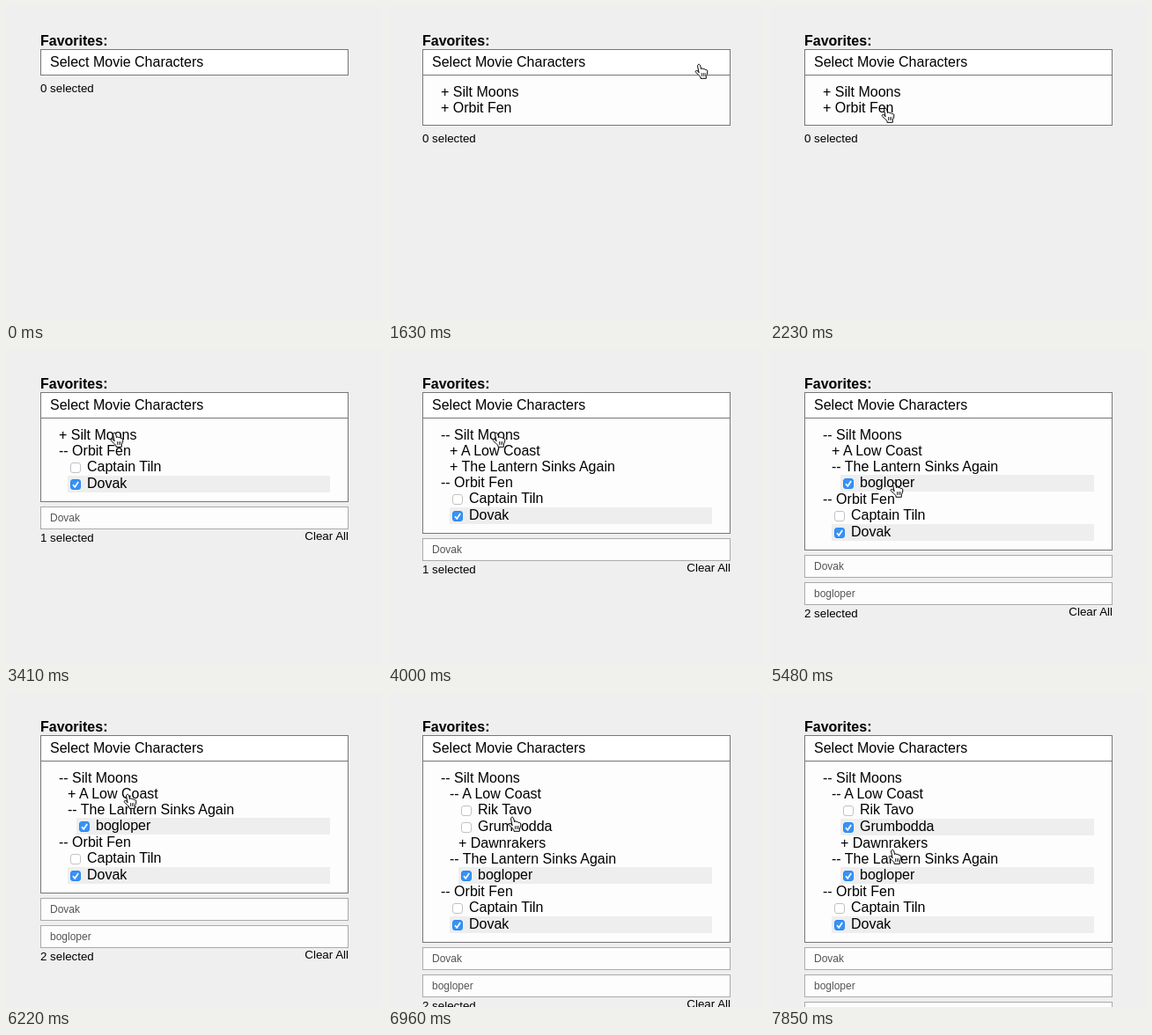
An HTML page for the animation above (8 s loop, 427 px wide and 358 px high).

```html
<!DOCTYPE html>
<html lang="en">
<head>
<meta charset="utf-8">
<title>Tree select</title>
<style>
  html, body { margin: 0; width: 100%; height: 100%; overflow: hidden; background: #efefef; }
  body { position: relative; font: 16px/18px "Liberation Sans", Arial, sans-serif; color: #000; }
  #field { position: absolute; left: 39px; top: 31px; width: 350px; }
  #field * { box-sizing: border-box; white-space: pre; }
  .title { height: 18px; font-weight: bold; }
  .head { height: 30px; padding-left: 10px; border: 1px solid #777; background: #fff; line-height: 28px; }
  .panel { padding: 10px 20px; border: 1px solid #777; border-top: 0; background: #fdfdfd; }
  .folder { height: 18px; }
  .leaf { position: relative; height: 19px; padding-left: 22px; }
  .leaf.on { background: #eee; }
  .leaf svg { position: absolute; left: 3px; top: 4px; }
  .pill { height: 26px; margin-top: 5px; padding-left: 10px; border: 1px solid #aaa; background: #fdfdfd;
          font-size: 12px; line-height: 24px; color: #555; }
  .status { position: relative; font-size: 13.33px; line-height: 15px; padding-top: 2px; }
  .panel + .status, .head + .status { margin-top: 5px; }
  .clear { position: absolute; right: 0; top: 0; }
  #hand { position: absolute; left: 0; top: 0; overflow: visible; }
</style>
</head>
<body>
<div id="field"></div>
<svg id="hand" width="16" height="18" fill="#fff" stroke="#000" stroke-linejoin="round" stroke-linecap="round">
  <path d="M5 10.4L3.7 4C3.2 1 5.9.1 6.7 2.9L7.6 6.6C8 5.5 9.8 5.5 10.1 7C10.7 6.1 12.2 6.5 12.4 7.7C13.3 7 14.8 7.6 14.8 9C14.8 12 14.2 13.2 13.3 14.6V17.3H7V15.6C5 13.6 3.6 12.2 1.7 10.5C.2 9 2.2 7.5 3.7 8.9Z"/>
  <path d="M8.5 11.5v3M10.4 11.5v3M12.2 11.5v3" stroke-width=".8"/>
</svg>
<script>
const LOOP = 8000;
const field = document.getElementById('field');
const hand = document.getElementById('hand');

const tree = [
  { name: 'Silt Moons', kids: [
    { name: 'A Low Coast', kids: [
      { name: 'Rik Tavo' },
      { name: 'Grumbodda' },
      { name: 'Dawnrakers', kids: [] }
    ] },
    { name: 'The Lantern Sinks Again', kids: [{ name: 'bogloper' }] }
  ] },
  { name: 'Orbit Fen', kids: [{ name: 'Captain Tiln' }, { name: 'Dovak' }] }
];

// The pointer advances one path point per step; the click lands on the last step.
const moves = [
  { start: 750, end: 1190, path: [[414, 108], [384, 84], [354, 67], [348, 65]], open: true },
  { start: 1630, end: 2380, path: [[348, 65], [302, 76], [220, 96], [148, 112], [126, 115], [126, 115]], toggle: 'Orbit Fen' },
  { start: 2680, end: 3110, path: [[127, 122], [127, 139], [126, 150], [126, 151]], check: 'Dovak' },
  { start: 3410, end: 4000, path: [[118, 94], [117, 87], [117, 86], [118, 92], [118, 94]], toggle: 'Silt Moons' },
  { start: 4300, end: 4740, path: [[122, 104], [130, 122], [134, 131], [134, 131]], toggle: 'The Lantern Sinks Again' },
  { start: 5040, end: 5480, path: [[135, 137], [136, 147], [136, 151], [136, 151]], check: 'bogloper' },
  { start: 5780, end: 6370, path: [[136, 145], [135, 130], [133, 118], [133, 115], [133, 115]], toggle: 'A Low Coast' },
  { start: 6810, end: 7260, path: [[134, 122], [136, 141], [138, 154], [138, 156]], check: 'Grumbodda' },
  { start: 7560, end: 7850, path: [[137, 163], [135, 173], [134, 178]] }
];

const tick = (on) => `<svg width="12" height="12">
  <rect x=".5" y=".5" width="11" height="11" rx="2.5" fill="${on ? '#3692f8' : '#fff'}" stroke="${on ? '#2c86ee' : '#c2c2c2'}"/>
  ${on ? '<path d="M3 6.3L5.2 8.8L9.2 3" fill="none" stroke="#fff" stroke-width="1.7"/>' : ''}</svg>`;

function rows(nodes, used, level = 0) {
  return nodes.map(({ name, kids }) => {
    const on = used.has(name);
    const indent = `style="margin-left:${level * 10}px"`;
    if (!kids) return `<div class="leaf${on ? ' on' : ''}" ${indent}>${tick(on)}${name}</div>`;
    return `<div class="folder" ${indent}>${on ? '--' : '+'} ${name}</div>` +
      (on ? rows(kids, used, level + 1) : '');
  }).join('');
}

function drawField(done) {
  const picked = done.filter(m => m.check).map(m => m.check);
  const used = new Set(done.map(m => m.toggle || m.check));
  const opened = done.some(m => m.open);
  field.innerHTML =
    '<div class="title">Favorites:</div><div class="head">Select Movie Characters</div>' +
    (opened ? `<div class="panel">${rows(tree, used)}</div>` : '') +
    picked.map(name => `<div class="pill">${name}</div>`).join('') +
    `<div class="status">${picked.length} selected` +
    (picked.length ? '<span class="clear">Clear All</span>' : '') + '</div>';
}

function stepOf({ start, end, path }, t) {
  const last = path.length - 1;
  return Math.min(last, Math.floor((t - start + 4) * last / (end - start)));
}

let shown = -1;
function render(t) {
  const begun = moves.filter(m => t >= m.start);
  const done = begun.filter(m => stepOf(m, t) === m.path.length - 1);
  if (done.length !== shown) {
    shown = done.length;
    drawField(done);
  }
  const move = begun[begun.length - 1];
  hand.style.visibility = move ? 'visible' : 'hidden';
  if (move) {
    const [x, y] = move.path[stepOf(move, t)];
    hand.style.transform = `translate(${x}px, ${y}px)`;
  }
}

const origin = performance.now();
function frame() {
  render((performance.now() - origin) % LOOP);
  requestAnimationFrame(frame);
}
frame();
</script>
</body>
</html>
```
